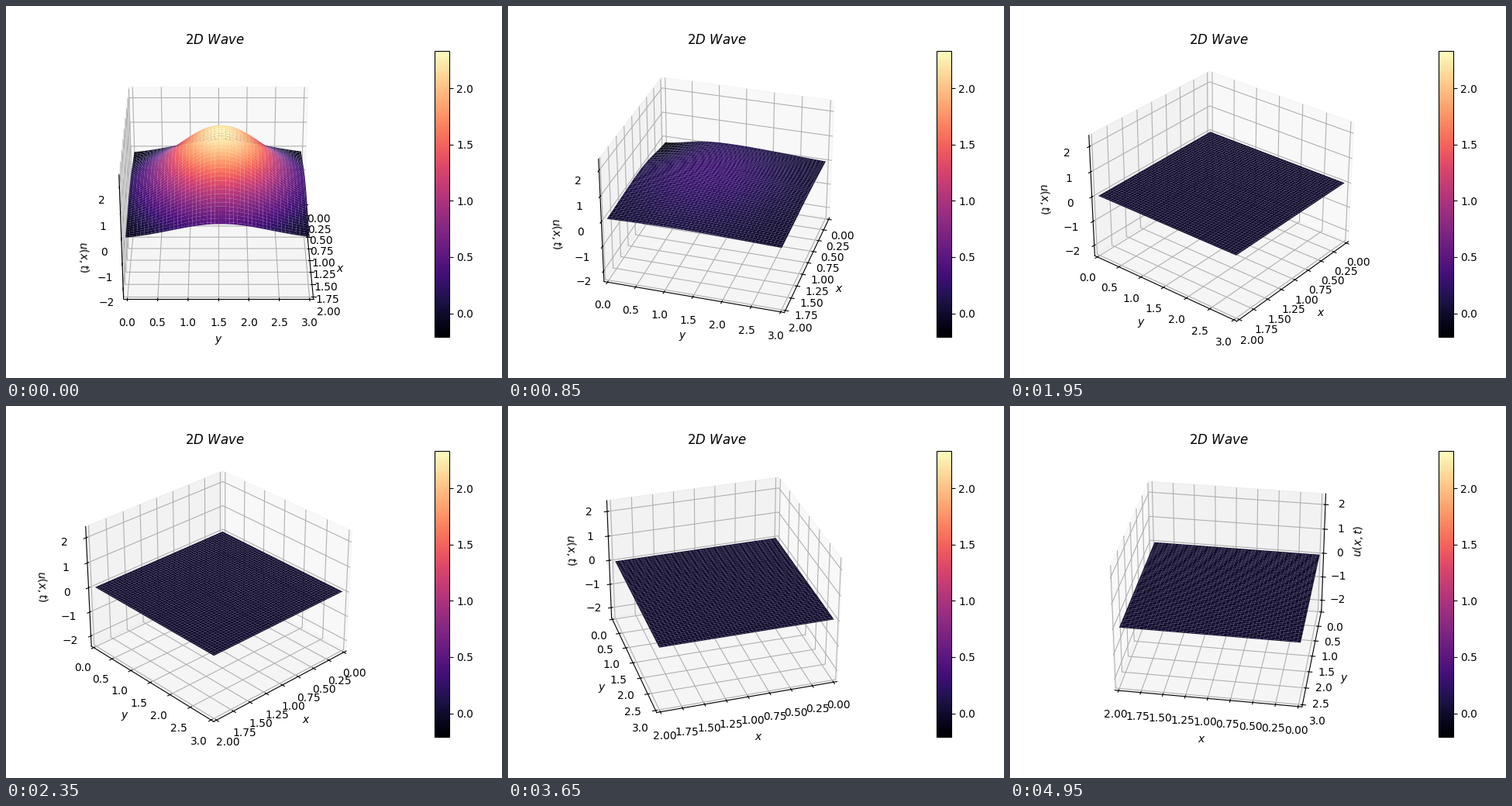
A matplotlib script that plays this animation: 640 px wide and 480 px high, repeating every 5 s.

```python
import numpy as np
import matplotlib.pyplot as plt
from matplotlib.animation import FuncAnimation

FRAMES = 100
CELLS = 50
LX, LY = 2.0, 3.0
Z_MIN, Z_MAX = -0.2117, 2.337
MARGIN = 1 / 48

# The grid stops one fine step (1 %) short of the far edges.
steps = np.minimum(np.arange(CELLS + 1) / CELLS, 0.99)
X, Y = np.meshgrid(LX * steps, LY * steps)


def wave(i):
    """Decaying hump that widens and drifts towards the corner at 0, 0."""
    hump = 2.56 * np.exp(-(i / 10.7) ** 1.5)
    sag = np.exp(-(i / 14) ** 2)
    dip = 0.26 * np.exp(-((i - 15) / 7) ** 2)
    spread = 1 / (1 + i / 20)
    mid_x = 0.5 - 0.006 * i
    mid_y = 1.54 - 0.02 * i
    bell_x = np.exp(-5.8 * spread * ((X / LX) ** 0.95 - mid_x) ** 2)
    bell_y = np.exp(-7 * spread * ((Y - mid_y) / LY) ** 2)
    corner = np.exp(-(X ** 2 + Y ** 2) / 0.3)
    return hump * bell_x * bell_y - sag * (0.27 - 0.045 * X) - dip * corner


def quads(z):
    p = np.stack([X, Y, z], axis=-1)
    cells = [p[:-1, :-1], p[:-1, 1:], p[1:, 1:], p[1:, :-1]]
    return np.stack(cells, axis=2).reshape(-1, 4, 3)


def padded(lo, hi):
    d = (hi - lo) * MARGIN
    return lo - d, hi + d


fig = plt.figure(figsize=(6.4, 4.8), dpi=100)
ax = fig.add_subplot(projection="3d")
surf = ax.plot_surface(X, Y, wave(0), cmap="magma",
                       rcount=CELLS + 1, ccount=CELLS + 1)
surf.set_clim(Z_MIN, Z_MAX)
fig.colorbar(surf, ax=ax, fraction=0.046, pad=0.2)

ax.set_xlim(*padded(0, LX))
ax.set_ylim(*padded(0, LY))
ax.set_zlim(*padded(-Z_MAX, Z_MAX))
ax.set_xlabel("$x$")
ax.set_ylabel("$y$")
ax.set_zlabel("$u(x,t)$")
ax.set_title(r"$2D\ Wave$")


def update(i):
    polys = quads(wave(i))
    surf.set_verts(polys)
    surf.set_array(polys[:, :, 2].mean(axis=1))
    ax.view_init(elev=30, azim=i)
    return [surf]


anim = FuncAnimation(fig, update, frames=FRAMES, interval=50,
                     repeat=True, repeat_delay=0, blit=False)
plt.show()
```
